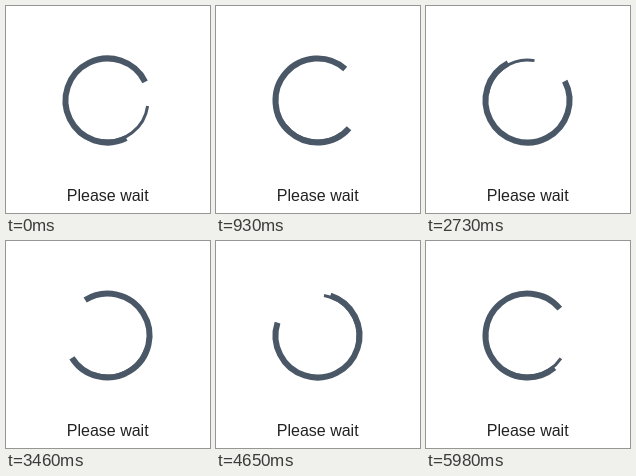
Recreate the animation shown at these times as an HTML page. Size 204x207 px, loop 6050 ms.

```html
<!DOCTYPE html>
<html lang="en">
<head>
<meta charset="utf-8">
<title>Please wait</title>
<style>
  html, body { margin: 0; width: 100%; height: 100%; overflow: hidden; background: #fff; }
  svg { display: block; width: 100vw; height: 100vh; }
  path { fill: none; stroke: #4a5766; }
  text { font: 16px Arial, "Liberation Sans", sans-serif; fill: #222; text-anchor: middle; }
</style>
</head>
<body>
<svg viewBox="0 0 204 207">
  <path id="outer" stroke-width="6"/>
  <path id="inner" stroke-width="3"/>
  <text x="101.7" y="195">Please wait</text>
</svg>
<script>
  const LOOP = 6050, STEP = 66.5, LAST = 90;
  const CX = 101.5, CY = 94.5;
  const START = 18.6, TURN = 24.12; // degrees, degrees per step
  const outer = document.getElementById('outer');
  const inner = document.getElementById('inner');

  function point(r, deg) {
    const a = deg * Math.PI / 180;
    return (CX + r * Math.cos(a)).toFixed(3) + ' ' + (CY + r * Math.sin(a)).toFixed(3);
  }

  function arc(r, from, sweep) {
    return `M${point(r, from)}A${r} ${r} 0 ${sweep > 180 ? 1 : 0} 1 ${point(r, from + sweep)}`;
  }

  // Step changes fall on whole hundredths of a second.
  function stepAt(t) {
    let n = Math.min(LAST, Math.floor(t / STEP) + 1);
    while (n > 0 && Math.round(n * STEP / 10) * 10 > t) n--;
    return n;
  }

  // The thin quarter turns backwards at twice the speed of the thick ring.
  function draw(t) {
    const turn = START + TURN * stepAt(t);
    outer.setAttribute('d', arc(42, turn + 45, 270));
    inner.setAttribute('d', arc(40.5, 45 - 2 * turn, 90));
  }

  const begin = performance.now();
  function tick() {
    draw((performance.now() - begin) % LOOP);
    requestAnimationFrame(tick);
  }
  draw(0);
  requestAnimationFrame(tick);
</script>
</body>
</html>
```
